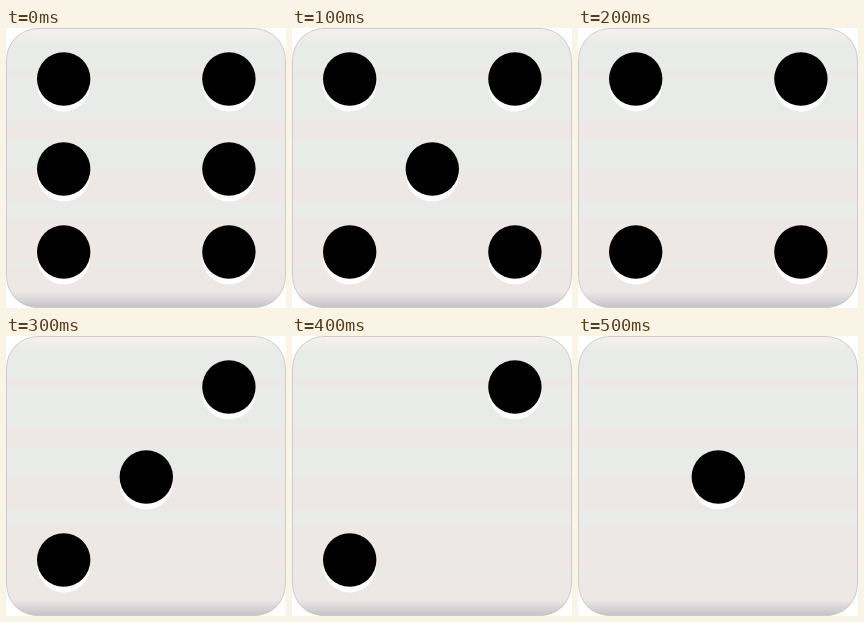
Animation of 280x280 px, one loop 0.6 s. Source, as an HTML page with a canvas:

```html
<!DOCTYPE html>
<html lang="en">
<head>
<meta charset="utf-8">
<title>Die countdown</title>
<style>
  html, body { margin: 0; width: 100%; height: 100%; overflow: hidden; background: #fff; }
  canvas { display: block; width: 280px; height: 280px; }
</style>
</head>
<body>
<canvas id="die" width="280" height="280"></canvas>
<script>
const ctx = document.getElementById('die').getContext('2d');
const SIZE = 280, STEP = 100, SIDES = 6;
const ROWS = [51, 141, 224];

function bodyPath(inset) {
  ctx.beginPath();
  ctx.roundRect(inset, inset, SIZE - 2 * inset, SIZE - 2 * inset, 32 - inset);
}

// fades a colour from the edge row into the face
function shade(edge, inner, rgb, alpha) {
  const fade = ctx.createLinearGradient(0, edge, 0, inner);
  fade.addColorStop(0, `rgba(${rgb},${alpha})`);
  fade.addColorStop(1, `rgba(${rgb},0)`);
  ctx.fillStyle = fade;
  ctx.fillRect(0, Math.min(edge, inner), SIZE, Math.abs(edge - inner));
}

function drawBody() {
  ctx.save();
  bodyPath(0);
  ctx.clip();
  ctx.fillStyle = '#e8ebe8';
  ctx.fillRect(0, 0, SIZE, SIZE);
  // evenly spaced pink bands that widen downwards
  ctx.fillStyle = '#ede8e6';
  for (let i = 0; i < 5; i++) ctx.fillRect(0, 43 + 49 * i, SIZE, 6 + 13 * i);
  shade(0, 16, '246,240,239', 1);
  shade(SIZE, 264, '190,188,195', 0.9);
  bodyPath(0.5);
  ctx.strokeStyle = '#cecbcb';
  ctx.lineWidth = 1;
  ctx.stroke();
  ctx.restore();
}

function disc(x, y, r, color) {
  ctx.fillStyle = color;
  ctx.beginPath();
  ctx.arc(x, y, r, 0, Math.PI * 2);
  ctx.fill();
}

function pip(col, row) {
  const x = 57.7 + 82.6 * col, y = ROWS[row];
  disc(x, y + 6, 26.5, '#fff');
  disc(x, y, 26.7, '#000');
}

// a pip and its mirror image through the centre
function pair(col, row) {
  pip(col, row);
  pip(2 - col, 2 - row);
}

function drawPips(n) {
  if (n % 2) pip(1, 1);
  if (n > 1) pair(2, 0);
  if (n > 3) pair(0, 0);
  if (n > 5) pair(0, 1);
}

function draw(now) {
  ctx.clearRect(0, 0, SIZE, SIZE);
  drawBody();
  drawPips(SIDES - Math.floor(now / STEP) % SIDES);
}

function tick() {
  draw(performance.now());
  requestAnimationFrame(tick);
}
tick();
</script>
</body>
</html>
```
